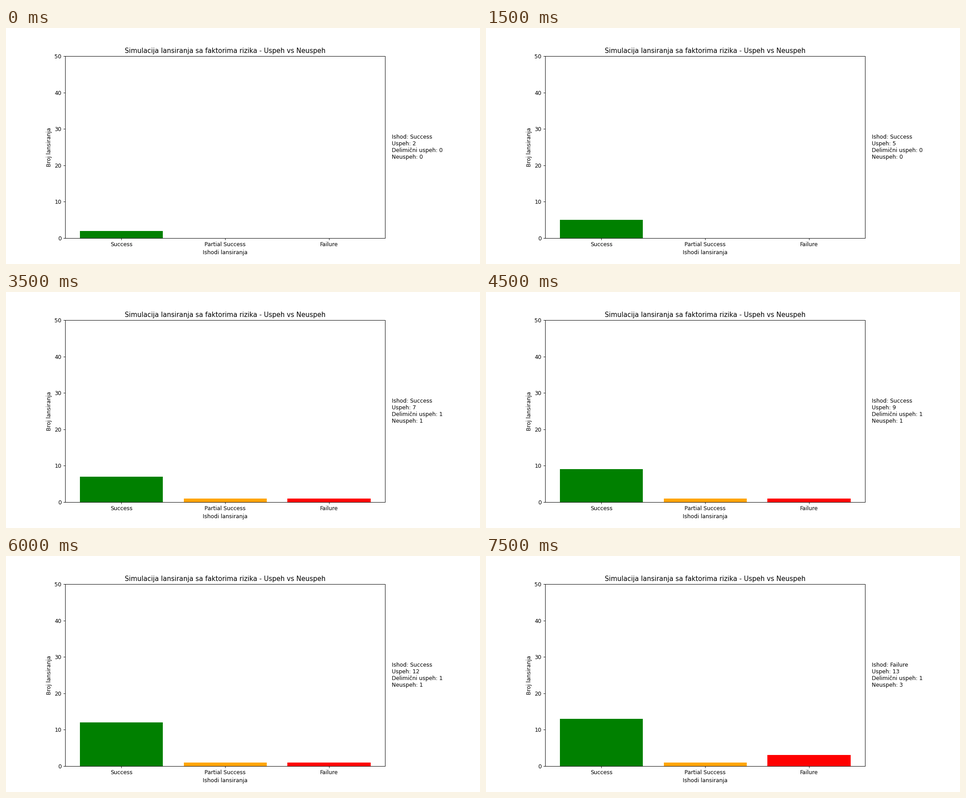
Write a matplotlib script that moves like this. It is 1058 by 529 pixels and loops after 8 s.

```python
import matplotlib.pyplot as plt
from matplotlib.animation import FuncAnimation

plt.rcParams["font.family"] = "DejaVu Sans"

NAMES = ["Success", "Partial Success", "Failure"]
COLORS = ["green", "orange", "red"]
START = [1, 0, 0]             # tally before the first launch shown
LAUNCHES = "SSSSPSFSSSSSSFSF"  # one outcome per step
STEP_MS = 500

# 12 x 6 inches on a stage of 1058 x 529 pixels
fig, ax = plt.subplots(figsize=(12, 6), dpi=529 / 6)
fig.subplots_adjust(left=0.125, right=0.8, bottom=0.11, top=0.88)

bars = ax.bar(NAMES, [0, 0, 0], color=COLORS)
ax.set_xlim(-0.54, 2.54)
ax.set_ylim(0, 50)
ax.set_title("Simulacija lansiranja sa faktorima rizika - Uspeh vs Neuspeh")
ax.set_xlabel("Ishodi lansiranja")
ax.set_ylabel("Broj lansiranja")
info = ax.text(1.02, 0.5, "", transform=ax.transAxes, fontsize=10,
               va="center", ha="left")


def update(i):
    done = LAUNCHES[:i + 1]
    counts = [n + done.count(name[0]) for n, name in zip(START, NAMES)]
    for bar, n in zip(bars, counts):
        bar.set_height(n)
    last = next(name for name in NAMES if name[0] == done[-1])
    info.set_text(f"Ishod: {last}\n"
                  f"Uspeh: {counts[0]}\n"
                  f"Delimični uspeh: {counts[1]}\n"
                  f"Neuspeh: {counts[2]}")
    return [*bars, info]


anim = FuncAnimation(fig, update, frames=len(LAUNCHES), interval=STEP_MS,
                     repeat=True, repeat_delay=0, blit=False)
plt.show()
```
